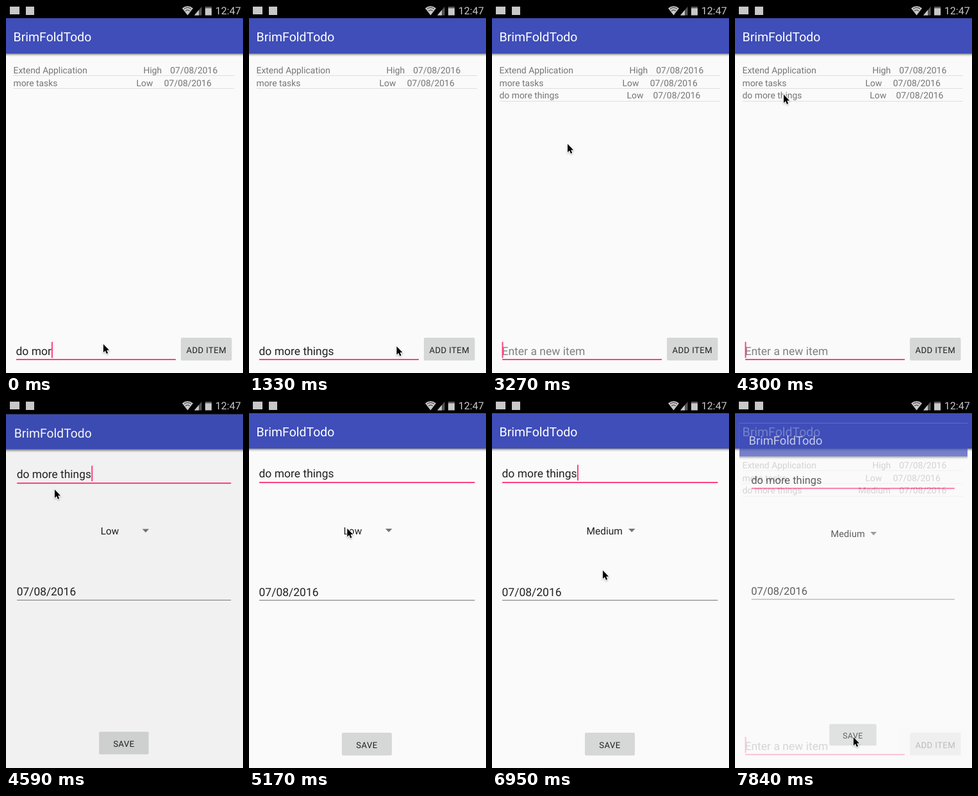
Recreate the animation shown at these times as an HTML page. Size 370 by 572 pixels, loop 7990 ms.

```html
<!DOCTYPE html>
<html lang="en">
<head>
<meta charset="utf-8">
<title>Todo demo</title>
<style>
html, body { margin: 0; width: 100%; height: 100%; overflow: hidden; background: #000; }
svg { display: block; width: 370px; height: 572px; font-family: Roboto, "Noto Sans", sans-serif; text-rendering: geometricPrecision; }
text { white-space: pre; fill: #212121; }
.title { font-size: 19.5px; fill: #fff; }
.row text { font-size: 13.9px; fill: #757575; }
.row path { stroke: #dedede; }
.field { font-size: 17.5px; }
.hint { fill: #808080; }
.button text { font-size: 13.2px; letter-spacing: .4px; }
.option { font-size: 15.5px; }
#menu text { fill: #111; }
.accent { fill: #ff4081; }
</style>
</head>
<body>
<svg viewBox="0 0 370 572">
  <defs>
    <linearGradient id="shade" x2="0" y2="1">
      <stop offset="0" stop-color="#000" stop-opacity=".5"/>
      <stop offset=".5" stop-color="#000" stop-opacity=".15"/>
      <stop offset="1" stop-color="#000" stop-opacity="0"/>
    </linearGradient>
    <filter id="lift" x="-20%" y="-20%" width="140%" height="140%">
      <feDropShadow dx="0" dy="2" stdDeviation="2.4" flood-opacity=".75"/>
    </filter>
    <filter id="soft" x="-50%" y="-50%" width="200%" height="200%">
      <feDropShadow dx="0" dy="1" stdDeviation="1" flood-opacity=".35"/>
    </filter>
    <g id="frame">
      <rect x="-4" y="19" width="378" height="557" fill="#fafafa"/>
      <rect x="-4" y="74" width="378" height="5" fill="url(#shade)"/>
      <rect x="-4" y="19" width="378" height="55" fill="#3f4eb8"/>
      <text class="title" x="11.5" y="55">BrimFoldTodo</text>
    </g>
  </defs>

  <rect width="370" height="572"/>
  <g id="list">
    <use href="#frame"/>
    <g id="rows"></g>
    <text id="entry" class="field" x="15.5" y="543.5"></text>
    <rect class="accent" x="16" y="550" width="249" height="2"/>
    <rect id="entryCaret" class="accent" y="523.5" width="2" height="25"/>
    <g class="button">
      <rect id="add" x="273" y="517" width="79.5" height="35.5" rx="2"/>
      <text x="281.5" y="540.5">ADD ITEM</text>
    </g>
  </g>

  <g id="edit">
    <use href="#frame"/>
    <text class="field" x="15.5" y="119">do more things</text>
    <rect class="accent" x="16" y="126" width="336.5" height="2"/>
    <rect id="editCaret" class="accent" x="133" y="99.5" width="2" height="24.5"/>
    <text id="level" class="option" x="147.5" y="207.5"></text>
    <path d="M213 199h10.5l-5.25 5.5z" fill="#757575"/>
    <text class="field" x="15.5" y="303.5">07/08/2016</text>
    <rect x="16" y="310" width="336.500" height="1" fill="#757575"/>
    <g class="button">
      <rect id="save" x="145" y="517" width="78" height="35.5" rx="2"/>
      <text x="167.3" y="540.5">SAVE</text>
    </g>
    <g id="menu">
      <rect x="139.5" y="190" width="88.5" height="140.5" rx="2" fill="#fafafa" filter="url(#lift)"/>
      <text class="option" x="147.5" y="219">Low</text>
      <text class="option" x="147.5" y="266">Medium</text>
      <text class="option" x="147.5" y="313">High</text>
    </g>
  </g>

  <g fill="#c8c8c8">
    <rect width="370" height="19" fill="#000"/>
    <rect x="6" y="1" width="15" height="12"/>
    <rect x="31" y="1" width="13" height="13"/>
    <path d="M275 3.5Q283.5-3 292 3.5L283.5 14.5z"/>
    <path d="M278 4.5q5.5-4 11 0M280 7.5q3.5-2.5 7 0" fill="none" stroke="#000" stroke-width=".8"/>
    <path d="M294 14.5L305.5 1V14.5z" fill="#555"/>
    <path d="M294 14.5L301 6.3V14.5z"/>
    <path d="M311 1h10v3h-10z" fill="#555"/>
    <path d="M311 3.5h10v11h-10z"/>
    <text x="326.8" y="13.3" font-size="16" style="fill:#c8c8c8">12:47</text>
  </g>

  <path id="pointer" d="M0 0V13L3 10.2L5 15L7.2 14.1L5.2 9.4H9.2z" stroke="#fff" stroke-width="1.6" paint-order="stroke" filter="url(#soft)"/>
</svg>
<script>
const LOOP = 7990, TICK = 148, LAST = 53;
const $ = id => document.getElementById(id);
const show = (id, on) => $(id).setAttribute('visibility', on ? 'visible' : 'hidden');
const within = (k, ...spans) => spans.some(([a, b]) => k >= a && k < b);

// Pointer path: tick, x, y
const path = [
  [7, 152, 527], [8, 188, 530], [10, 273, 531], [13, 273, 531], [14, 293, 530],
  [16, 293, 530], [17, 289, 518], [19, 218, 390], [21, 136, 250], [23, 100, 180],
  [26, 76, 138], [31, 76, 138], [33, 112, 168], [36, 174, 214], [37, 171, 208],
  [38, 167, 202], [40, 167, 202], [43, 173, 264], [47, 173, 264], [49, 181, 390],
  [51, 185, 524]
];
const typed = ['do mor', 'do more', 'do more t', 'do more th', 'do more thin', 'do more things'];

function pointerAt(k) {
  const i = path.findIndex(p => p[0] >= k);
  if (i < 0) return path[path.length - 1].slice(1);
  if (i === 0) return path[0].slice(1);
  const [a, x, y] = path[i - 1], [b, u, v] = path[i];
  const f = (k - a) / (b - a);
  return [x + (u - x) * f, y + (v - y) * f];
}

function row(i, name, level, levelX, dateX) {
  const y = 105 + i * 19.6;
  const cell = (x, s) => `<text x="${x}" y="${y}">${s}</text>`;
  return `<g class="row">${cell(11.5, name)}${cell(levelX, level)}${cell(dateX, '07/08/2016')}` +
    `<path d="M12 ${Math.round(y + 3.4) + .5}H356"/></g>`;
}

function drawRows(k) {
  let rows = row(0, 'Extend Application', 'High', 214.5, 256.3) + row(1, 'more tasks', 'Low', 203.5, 246.8);
  if (k >= 16) rows += k < 52
    ? row(2, 'do more things', 'Low', 210.5, 251.5)
    : row(2, 'do more things', 'Medium', 192.5, 256.3);
  $('rows').innerHTML = rows;
}

function drawEntry(k) {
  const empty = k >= 16, entry = $('entry');
  entry.textContent = empty ? 'Enter a new item' : typed[Math.min(k, 5)];
  entry.classList.toggle('hint', empty);
  $('entryCaret').setAttribute('x', empty ? 15.5 : 15.5 + entry.getComputedTextLength());
  show('entryCaret', !within(k, [8, 12], [19, 22], [26, 29]));
}

function drawEdit(k) {
  const open = k < 30 ? 0 : k === 30 ? .6 : k === 31 ? .965 : k < LAST ? 1 : .71;
  const size = .8 + .2 * open;
  show('edit', open > 0);
  $('edit').setAttribute('opacity', open);
  $('edit').setAttribute('transform', `translate(184 286) scale(${size}) translate(-184 -286)`);
  $('list').setAttribute('opacity', k < LAST ? 1 - open : 1);
  $('level').textContent = k < 46 ? 'Low' : 'Medium';
  $('editCaret').setAttribute('opacity', within(k, [34, 37], [50, 54]) ? 0 : 1);
  $('menu').setAttribute('opacity', within(k, [40, 46]) ? 1 : k === 46 ? .4 : 0);
}

function draw(t) {
  const k = Math.min(LAST, Math.floor((t + 12) / TICK));
  drawRows(k);
  drawEntry(k);
  drawEdit(k);
  $('add').setAttribute('fill', k === 15 ? '#c6c7c7' : '#d6d7d7');
  $('save').setAttribute('fill', k === 52 ? '#c6c7c7' : '#d6d7d7');
  $('pointer').setAttribute('transform', `translate(${pointerAt(k)})`);
}

const start = performance.now();
function loop() {
  draw((performance.now() - start) % LOOP);
  requestAnimationFrame(loop);
}
loop();
</script>
</body>
</html>
```
